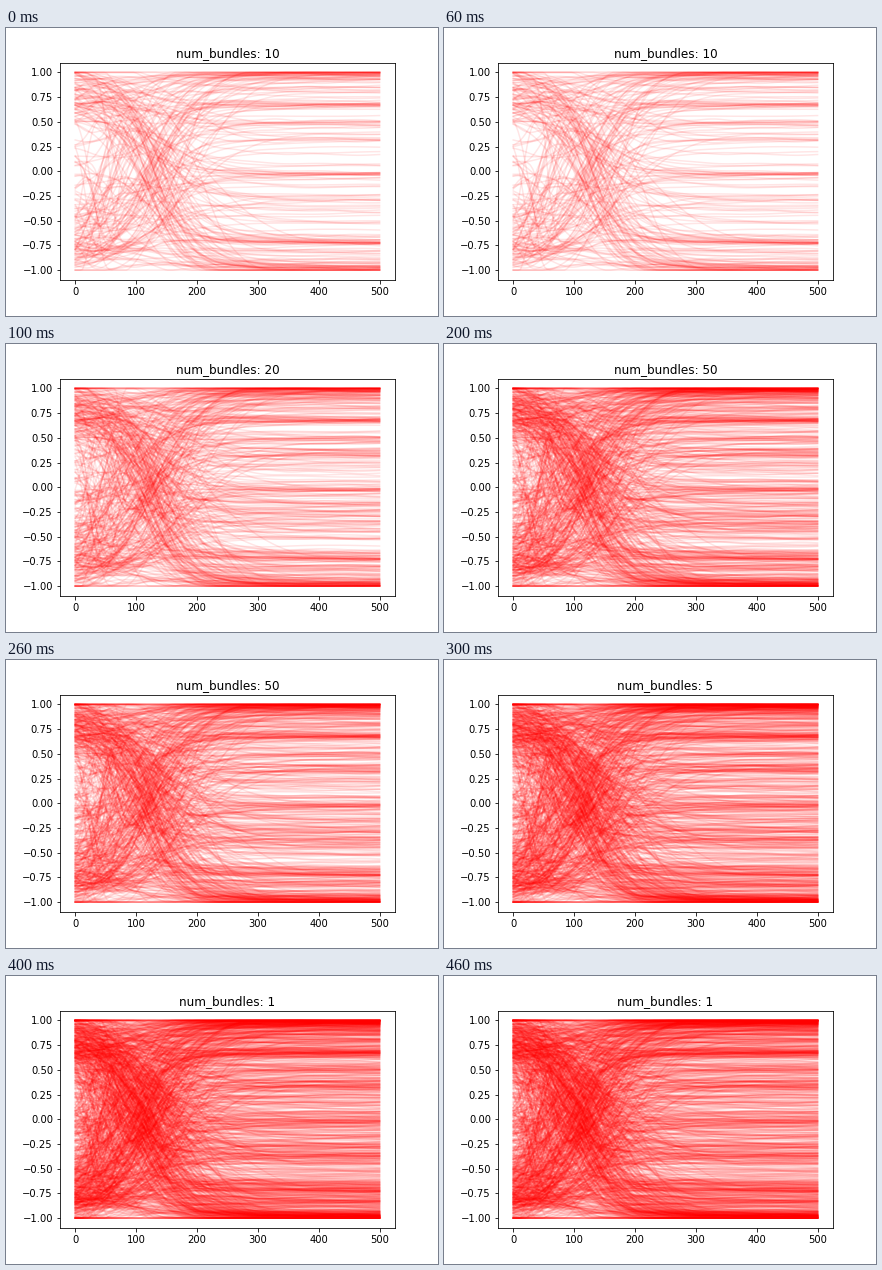
Animation of 432 by 288 pixels, one loop 500 ms. Source, as a matplotlib script:

```python
import numpy as np
import matplotlib.pyplot as plt
from matplotlib.animation import FuncAnimation
from matplotlib.collections import LineCollection

plt.rcParams["font.family"] = "DejaVu Sans"

BUNDLES = [10, 20, 50, 5, 1]
CURVES = 215  # added with every stage
STEPS = np.linspace(0, 500, 126)


def sigmoid(centre, width):
    return 1 / (1 + np.exp(-(STEPS - centre) / width))


def pick_ends(rng, bunching):
    """Final values: denser towards the rims, gathered into loose bands."""
    u = rng.uniform(-1, 1, (CURVES, 1))
    ends = np.sin(1.3 * u) / np.sin(1.3)
    ends += 0.05 * bunching * np.sin(2 * np.pi * (ends - 0.15) / 0.35)
    rims = np.sign(u) * (1 - abs(rng.normal(0, 0.025, u.shape)))
    return np.where(rng.random(u.shape) < 0.14, rims, ends)


def make_curves(rng, stage):
    """Curves that settle early, swing through the crossing and fan out."""
    shape = (CURVES, 1)

    def uniform(low, high):
        return rng.uniform(low, high, shape)

    def normal(centre, spread):
        return rng.normal(centre, spread, shape)

    def pick(share, yes, no):
        return np.where(rng.random(shape) < share, yes, no)

    ends = pick_ends(rng, 1 / (1 + stage))
    side = np.sign(ends) * pick(0.58, -1, 1)
    middle = side * (1 - rng.gamma(2.2, 0.08, shape))
    middle = pick(0.2, uniform(-0.9, 0.9), middle)
    starts = pick(0.72, middle + normal(0, 0.06), uniform(-1, 1))

    # A tight strand forms the visible X, the others scatter around it.
    tight = (rng.random(shape) < 0.35) & (abs(ends) > 0.6)
    cross = 128 - 8 * stage
    centre = np.where(tight, normal(cross, 9), normal(cross, 38))
    width = np.where(tight, uniform(21, 29), uniform(20, 55))
    swing = sigmoid(centre, width)
    settle = sigmoid(uniform(15, 75), uniform(5, 16))

    phase = uniform(0, 2 * np.pi)
    period = uniform(9, 24)
    drift = normal(0, 0.1) * np.exp(-STEPS / 190)
    wobble = normal(0, 0.04) * np.exp(-STEPS / 120)
    ripple = 0.006 * np.sin(STEPS / (2 * period) + phase)

    y = starts + (middle - starts) * settle + (ends - middle) * swing
    y += drift + wobble * np.sin(STEPS / period + phase) + ripple
    return [np.column_stack([STEPS, row]) for row in np.clip(y, -1, 1)]


fig, ax = plt.subplots(figsize=(6, 4), dpi=72)
fig.subplots_adjust(left=0.125, right=0.9, bottom=0.125, top=0.88)
ax.set_xlim(-25, 525)
ax.set_ylim(-1.1, 1.1)
title = ax.set_title("")

rng = np.random.default_rng(12)
layers = [
    ax.add_collection(
        LineCollection(make_curves(rng, stage), colors="red", alpha=0.1,
                       linewidths=1.5, capstyle="projecting"),
        autolim=False)
    for stage in range(len(BUNDLES))
]


def update(stage):
    for i, layer in enumerate(layers):
        layer.set_visible(i <= stage)
    title.set_text(f"num_bundles: {BUNDLES[stage]}")
    return [*layers, title]


anim = FuncAnimation(fig, update, frames=len(BUNDLES), interval=100,
                     repeat=True, repeat_delay=0, blit=False)
plt.show()
```
